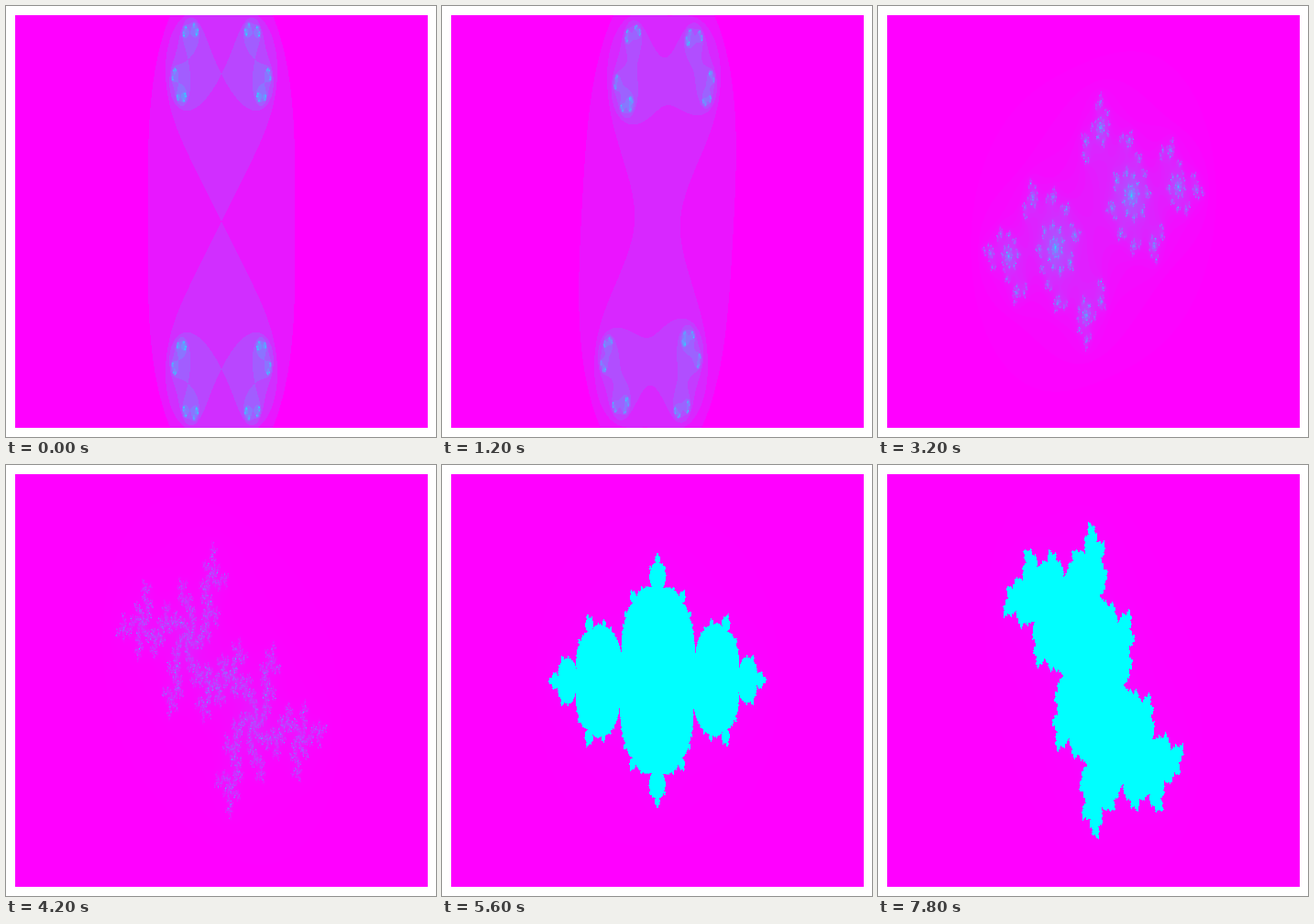
An HTML page with a canvas for the animation above (8000 ms loop, 469 by 470 pixels).

```html
<!DOCTYPE html>
<html lang="en">
<head>
<meta charset="utf-8">
<title>Julia set spiral</title>
<style>
  html, body { margin: 0; width: 100%; height: 100%; overflow: hidden; background: #fff; }
  canvas { position: absolute; left: 10px; top: 10px; width: 450px; height: 450px; }
</style>
</head>
<body>
<canvas id="stage" width="450" height="450"></canvas>
<script>
const SIZE = 450, STEPS = 40, STEP_MS = 200, MAX_ITER = 300;
const HALF_WIDTH = 2.8, HALF_HEIGHT = 1.4;

const ctx = document.getElementById('stage').getContext('2d');
const image = ctx.createImageData(SIZE, SIZE);
const counts = new Uint16Array(SIZE * SIZE);

// The constant spirals inwards from 1 towards 0.
function constantAt(step) {
  const progress = step / 99;
  const radius = 1 - progress, angle = 100 * progress;
  return [radius * Math.cos(angle), radius * Math.sin(angle)];
}

function escapeCount(x, y, cx, cy) {
  for (let n = 0; n < MAX_ITER; n++) {
    const nextX = x * x - y * y + cx;
    y = 2 * x * y + cy;
    x = nextX;
    if (x * x + y * y > 4) return n;
  }
  return MAX_ITER;
}

const coordinate = (pixel, half) => ((pixel + 0.5) / SIZE * 2 - 1) * half;

function draw(step) {
  const [cx, cy] = constantAt(step);
  const last = counts.length - 1;
  let peak = 1;

  // Point symmetry about the centre: compute the upper half only.
  for (let i = 0; i < counts.length / 2; i++) {
    const x = coordinate(i % SIZE, HALF_WIDTH);
    const y = -coordinate(Math.floor(i / SIZE), HALF_HEIGHT);
    const count = escapeCount(x, y, cx, cy);
    counts[i] = counts[last - i] = count;
    if (count > peak) peak = count;
  }

  // Magenta for the fastest escape, cyan for the slowest.
  for (let i = 0; i < counts.length; i++) {
    const level = Math.round(255 * counts[i] / peak);
    image.data[4 * i] = 255 - level;
    image.data[4 * i + 1] = level;
    image.data[4 * i + 2] = 255;
    image.data[4 * i + 3] = 255;
  }
  ctx.putImageData(image, 0, 0);
}

const start = performance.now();
let shown = -1;

function tick() {
  const step = Math.floor((performance.now() - start) / STEP_MS) % STEPS;
  if (step !== shown) {
    draw(step);
    shown = step;
  }
  requestAnimationFrame(tick);
}
tick();
</script>
</body>
</html>
```
